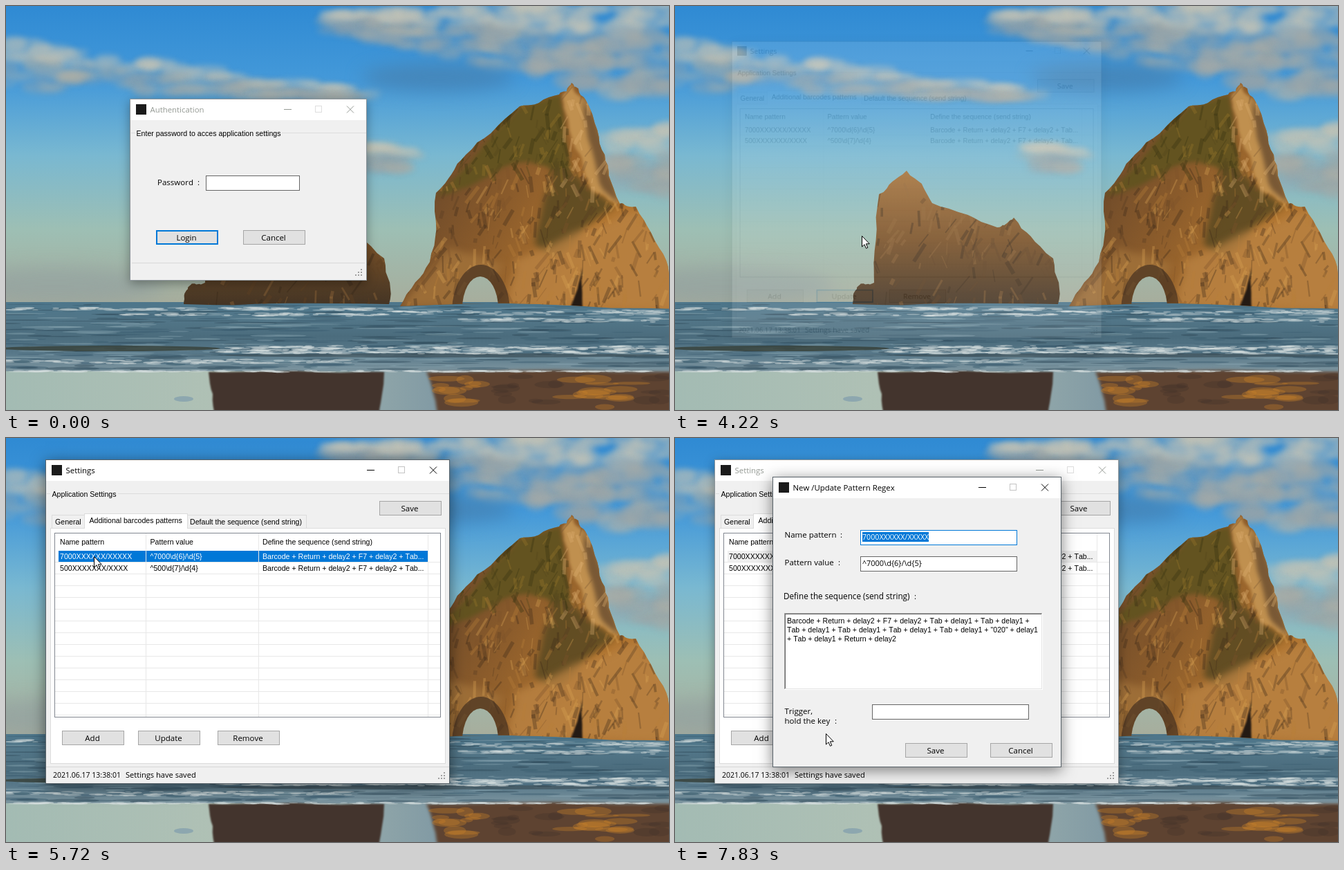
Animation of 959 by 584 pixels, one loop 8000 ms. Source, as an HTML page with a canvas:

```html
<!DOCTYPE html>
<html lang="en">
<head>
<meta charset="utf-8">
<title>Password dialog and settings</title>
<style>
html, body { margin: 0; width: 100%; height: 100%; overflow: hidden; background: #4a7690; }
canvas { display: block; width: 959px; height: 584px; }
</style>
</head>
<body>
<canvas id="stage" width="959" height="584"></canvas>
<script>
const W = 959, H = 584, LOOP = 8000;
const UI = '"Open Sans", "Noto Sans", sans-serif';
const MS = '"Liberation Sans", Arial, sans-serif';
const BLUE = '#0078d7', FACE = '#f0f0f0', INK = '#000';
const c = document.getElementById('stage').getContext('2d');

function layer() {
  const el = document.createElement('canvas');
  el.width = W;
  el.height = H;
  return el.getContext('2d');
}

// ---------- landscape ----------
let seed = 7;
const rnd = (a = 0, b = 1) => {
  seed = (seed * 16807) % 2147483647;
  return a + (b - a) * seed / 2147483647;
};
const pick = list => list[Math.floor(rnd(0, list.length))];

function ramp(g, x0, y0, x1, y1, cols) {
  const r = g.createLinearGradient(x0, y0, x1, y1);
  cols.forEach((col, i) => r.addColorStop(i / (cols.length - 1), col));
  return r;
}

const points = s => s.split(' ').map(p => p.split(',').map(Number));

function path(g, pts) {
  g.beginPath();
  pts.forEach(p => g.lineTo(...p));
  g.closePath();
}

// Roughens an outline by shifting the middle of each side, three times over.
function crag(s, rough) {
  let pts = points(s);
  for (let k = 0; k < 3; k++, rough /= 2) {
    pts = pts.flatMap((p, i) => {
      const q = pts[(i + 1) % pts.length];
      return [p, [0, 1].map(d => (p[d] + q[d]) / 2 + rnd(-rough, rough))];
    });
  }
  return pts;
}

function shape(g, s, fill, blur = 0, alpha = 1, rough = 6) {
  g.save();
  if (blur) g.filter = `blur(${blur}px)`;
  g.globalAlpha = alpha;
  g.fillStyle = fill;
  path(g, crag(s, rough));
  g.fill();
  g.restore();
}

function oval(g, x, y, rx, ry, fill, alpha = 1) {
  g.globalAlpha = alpha;
  g.fillStyle = fill;
  g.beginPath();
  g.ellipse(x, y, rx, ry, 0, 0, 7);
  g.fill();
  g.globalAlpha = 1;
}

// A sloping bank of cloud whose depth runs from h0 to h1; the upper part is sunlit.
function cloud(g, n, x, y, w, slope, h0, h1, alpha) {
  g.save();
  g.filter = 'blur(4px)';
  for (let i = 0; i < n; i++) {
    const u = rnd(), v = rnd(), h = h0 + (h1 - h0) * u;
    const col = v < .35 ? '#cbc5b5' : pick(['#a5aaa6', '#b5b2a6', '#97a3a8']);
    oval(g, x + u * w, y + u * slope + v * h, rnd(14, 36), rnd(3, 4 + h / 10), col, alpha);
  }
  g.restore();
}

function strokes(g, n, x, y, w, h, cols, alpha) {
  g.save();
  g.filter = 'blur(.7px)';
  g.globalAlpha = alpha;
  for (let i = 0; i < n; i++) {
    const px = x + rnd(0, w), py = y + rnd(0, h), len = rnd(6, 26);
    g.strokeStyle = pick(cols);
    g.lineWidth = rnd(1, 6);
    g.beginPath();
    g.moveTo(px, py);
    g.lineTo(px + len * rnd(-.9, .6), py + len);
    g.stroke();
  }
  g.restore();
}

function foam(g, x0, x1, y, h) {
  for (let i = 0; i < (x1 - x0) / 6; i++) {
    oval(g, rnd(x0, x1), y + rnd(-h, h), rnd(4, 16), rnd(.5, 1.6), '#d5dddd', .45);
  }
}

function sky(g) {
  g.fillStyle = ramp(g, 0, 0, 0, 430, ['#2f8ad3', '#4499d9', '#79b8d1', '#9dbfb4', '#a7ad9c']);
  g.fillRect(0, 0, W, 430);
  cloud(g, 120, -20, 45, 550, 80, 75, 12, .4);
  cloud(g, 200, 470, 10, 510, -25, 25, 160, .42);
  cloud(g, 25, 520, 192, 70, 15, 50, 25, .4);
  cloud(g, 45, 875, 185, 100, -10, 70, 110, .4);
  g.save();
  g.filter = 'blur(12px)';
  oval(g, 625, 103, 110, 20, '#4684b6', .85);
  oval(g, 70, 405, 160, 28, '#8f9fa0', .6);
  g.restore();
}

function sea(g) {
  g.fillStyle = ramp(g, 0, 428, 0, 528, ['#4d768b', '#527688', '#4b6c7d', '#59798a', '#7d959f']);
  g.fillRect(0, 428, W, 100);
  for (let i = 0; i < 380; i++) {
    const v = rnd();
    oval(g, rnd(0, W), 431 + 95 * v, rnd(10, 50), rnd(.5, 1 + 1.5 * v), pick(['#2e4857', '#385a6d', '#8aa6b1']), .45);
  }
  oval(g, 150, 495, 160, 4, '#39433d', .85);
  oval(g, 640, 505, 330, 3, '#3e5059', .7);
}

function waves(g) {
  foam(g, 0, 560, 438, 2);
  foam(g, 170, 560, 446, 2);
  foam(g, 560, W, 443, 4);
  foam(g, 650, W, 454, 3);
  for (let i = 0; i < 3; i++) foam(g, 310, W, 496 + i, 5);
  foam(g, 0, 500, 514, 3);
  foam(g, 0, W, 528, 1);
}

function sand(g) {
  g.fillStyle = ramp(g, 0, 0, W, 0, ['#a3bbb3', '#b0c1b5', '#7f98a3', '#7c8b91']);
  g.fillRect(0, 528, W, 56);
  shape(g, '293,529 547,529 538,600 302,600', '#43342d', 1, 1, 4);
  shape(g, '608,529 980,529 980,600 627,600', '#5e4331', 2, 1, 4);
  for (let i = 0; i < 45; i++) {
    const u = rnd(), gold = Math.sin(9 * u + 1.2) > .1;
    oval(g, 618 + 340 * u, rnd(532, 580), rnd(8, 28), rnd(2, 7), gold ? '#c8822a' : '#44332a', .35);
  }
  oval(g, 257, 568, 14, 4, '#7f9dac', .7);
}

function smallRock(g) {
  const body = crag('257,431 266,404 288,400 295,272 335,238 372,285 466,320 490,306 547,365 554,431', 5);
  path(g, body);
  g.fillStyle = ramp(g, 0, 240, 0, 430, ['#a5733c', '#7b5228', '#453524']);
  g.fill();
  g.save();
  g.clip();
  strokes(g, 180, 255, 240, 300, 190, ['#38291a', '#94683a', '#5f4122'], .4);
  g.restore();
}

function bigRock(g) {
  const r = layer();
  const body = crag('570,434 613,370 622,270 665,215 743,145 800,128 818,111 838,135 866,215 888,286 911,290 955,368 975,438', 5);
  path(r, body);
  r.fillStyle = ramp(r, 600, 230, 950, 420, ['#68472a', '#8a5b2b', '#b0742f', '#ae7434']);
  r.fill();
  r.clip();
  shape(r, '622,275 743,145 802,128 818,240 755,225 690,250', '#635320', 3);
  shape(r, '790,225 822,240 880,290 800,360 765,345', '#584822', 5, .85);
  shape(r, '735,368 911,295 975,368 975,438 722,438', '#b98243', 6, .8);
  shape(r, '570,434 640,350 720,375 660,438', '#a3733b', 6, .8);
  strokes(r, 420, 570, 230, 390, 210, ['#3a2817', '#b9803b', '#7b5329', '#dba355', '#543a20'], .33);
  strokes(r, 130, 630, 130, 185, 110, ['#393512', '#93742a', '#54461c'], .38);
  shape(r, '806,128 818,111 838,135 888,286 845,262 818,190', '#c0904f', 2);
  shape(r, '832,122 866,205 892,292 858,255', '#6d4f31', 3, .85);
  strokes(r, 50, 805, 115, 75, 150, ['#dcb070', '#7a5833'], .35);
  shape(r, '816,438 833,378 834,438', '#241a13', 1, 1, 2);
  oval(r, 687, 442, 42, 68, '#3f2d1f', .65);
  r.globalCompositeOperation = 'destination-out';
  oval(r, 686, 437, 26, 46, '#000');
  g.drawImage(r.canvas, 0, 0);
}

const bg = layer();
[sky, sea, smallRock, bigRock, sand, waves].forEach(paint => paint(bg));

// ---------- controls ----------
function text(g, s, x, y, size = 11.5, face = UI, col = INK, align = 'left') {
  g.font = `${size}px ${face}`;
  g.fontKerning = 'none';
  g.textAlign = align;
  g.fillStyle = col;
  g.fillText(s, x, y);
}
const ms = (g, s, x, y, col) => text(g, s, x, y, 10.6, MS, col);

function label(g, s, x, y, colon, size) {
  text(g, s, x, y, size);
  text(g, ':', colon, y);
}

function rect(g, x, y, w, h, fill) {
  g.fillStyle = fill;
  g.fillRect(x, y, w, h);
}

function box(g, x, y, w, h, fill, line, lw = 1) {
  rect(g, x, y, w, h, line);
  rect(g, x + lw, y + lw, w - 2 * lw, h - 2 * lw, fill);
}

function button(g, s, x, y, state = '') {
  const fill = { hover: '#e5f1fb', press: '#cce4f7' }[state] || '#e1e1e1';
  box(g, x, y, 90, 21, fill, state ? BLUE : '#a6a6a6', state === 'focus' ? 2 : 1);
  text(g, s, x + 44, y + 14.5, 11.5, UI, INK, 'center');
}

const field = (g, x, y, w, on) => box(g, x, y, w, 22, '#fff', on ? BLUE : '#666');

function frame(g, title, x, y, w, h, on) {
  const r = x + w, m = y + 15.5, ink = on ? INK : '#959a94';
  g.save();
  g.shadowColor = on ? 'rgba(0,0,0,.5)' : 'rgba(0,0,0,.35)';
  g.shadowBlur = on ? 20 : 14;
  g.shadowOffsetY = 4;
  rect(g, x, y, w, h, on ? '#59636a' : '#8c9499');
  g.restore();
  rect(g, x + 1, y + 1, w - 2, h - 2, FACE);
  rect(g, x + 1, y + 1, w - 2, 30, '#fff');
  rect(g, x + 9, y + 8, 15, 15, '#1b1b1b');
  text(g, title, x + 29.5, y + 19.5, 11.4, UI, ink);
  rect(g, r - 120, y + 15, 11, 1, ink);
  g.lineWidth = 1;
  g.strokeStyle = on ? '#c4c4c4' : '#dedede';
  g.strokeRect(r - 74.5, m - 5, 9, 9);
  g.strokeStyle = ink;
  g.beginPath();
  [-5, 5].forEach(d => {
    g.moveTo(r - 24 - d, m - 5);
    g.lineTo(r - 24 + d, m + 5);
  });
  g.stroke();
}

function grip(g, r, b) {
  for (let i = 0; i < 3; i++)
    for (let j = 0; j < 3 - i; j++) rect(g, r - 9 - 4 * j, b - 9 - 4 * i, 2, 2, '#a0a0a0');
}

// ---------- windows ----------
const typed = [1750, 2010, 2140, 2470, 2670];

function loginWindow(g, t, at) {
  const on = t >= 870, edit = on && t < 3800;
  frame(g, 'Authentication', 179, 134, 343, 263, on);
  rect(g, 181, 183, 340, 1, '#dcdcdc');
  rect(g, 187, 183, 212, 1, FACE);
  ms(g, 'Enter password to acces application settings', 188.5, 188);
  label(g, 'Password', 219, 259, 277);
  field(g, 289, 245, 136, edit);
  const n = typed.filter(k => t >= k).length;
  for (let i = 0; i < n; i++) oval(g, 295 + 6 * i, 253.5, 2.2, 1.8, INK);
  const caret = (t >= 1010 && t < 1620) || (t >= 1810 && t < 3200);
  if (caret) rect(g, 292 + 6 * n, 249, 1, 13, INK);
  let state = on ? '' : 'focus';
  if (t >= 3460 && inside(at, 217, 324)) state = t >= 3800 && t < 3900 ? 'press' : 'hover';
  button(g, 'Login', 217, 324, state);
  button(g, 'Cancel', 343, 324);
  rect(g, 182, 371, 337, 1, '#d9d9d9');
  grip(g, 522, 397);
}

function settingsWindow(g, t, at) {
  const on = t < 7490, picked = t >= 5590, line = '#dcdcdc', grid = '#e8e8e8';
  frame(g, 'Settings', 57, 31, 585, 469, on);
  rect(g, 59, 80, 582, 1, line);
  rect(g, 64, 80, 98, 1, FACE);
  ms(g, 'Application Settings', 66.5, 85);
  button(g, 'Save', 540, 91);
  box(g, 64, 130, 572, 341, '#fff', line);
  box(g, 66, 111, 48, 20, FACE, line);
  box(g, 262, 111, 173, 20, FACE, line);
  box(g, 113, 109, 150, 22, '#fff', line);
  rect(g, 114, 129, 148, 3, '#fff');
  ms(g, 'General', 71, 125);
  ms(g, 'Additional barcodes patterns', 120.5, 123);
  ms(g, 'Default the sequence (send string)', 266, 125);

  box(g, 70, 137, 559, 267, '#fff', '#828790');
  for (let y = 179; y < 403; y += 17) rect(g, 71, y, 557, 1, grid);
  if (picked) rect(g, 76, 163, 535, 16, on ? BLUE : FACE);
  [202, 365, 610].forEach(x => rect(g, x, 138, 1, 265, grid));
  const seq = 'Barcode + Return + delay2 + F7 + delay2 + Tab...';
  [['Name pattern', 'Pattern value', 'Define the sequence (send string)'],
    ['7000XXXXXX/XXXXX', '^7000\\d{6}/\\d{5}', seq],
    ['500XXXXXXX/XXXX', '^500\\d{7}/\\d{4}', seq]].forEach((row, i) => {
    const y = i ? 158 + 17 * i : 154, ink = i === 1 && picked && on ? '#fff' : INK;
    row.forEach((s, j) => ms(g, s, [78, 208.5, 371][j], y, ink));
  });

  let state = picked ? '' : 'focus';
  if (t > 6530 && inside(at, 191, 423)) state = t >= 7350 && t < 7430 ? 'press' : 'hover';
  button(g, 'Add', 81, 423);
  button(g, 'Update', 191, 423, state);
  button(g, 'Remove', 306, 423);
  rect(g, 58, 475, 583, 1, '#d7d7d7');
  text(g, '2021.06.17 13:38:01', 68, 491, 10.5);
  text(g, 'Settings have saved', 173, 491, 11.1);
  grip(g, 642, 500);
}

function patternWindow(g) {
  frame(g, 'New /Update Pattern Regex', 141, 56, 418, 420, true);
  label(g, 'Name pattern', 158.5, 144, 239);
  label(g, 'Pattern value', 158.5, 184, 236);
  label(g, 'Define the sequence (send string)', 157, 233, 346, 11.7);
  text(g, 'Trigger,', 158.5, 399);
  label(g, 'hold the key', 158.5, 413, 231);
  field(g, 268, 133, 227, true);
  rect(g, 271, 136, 96, 14, BLUE);
  text(g, '7000XXXXXX/XXXXX', 271, 147, 10.7, UI, '#fff');
  field(g, 268, 171, 227);
  text(g, '^7000\\d{6}/\\d{5}', 271, 185, 11);
  field(g, 285, 385, 227);

  // Sunken edge: dark above and left, light below and right.
  ['#fff', '#a0a0a0', '#e3e3e3', '#696969', '#fff'].forEach((col, i) => {
    const d = i >> 1;
    rect(g, 158 + d, 253 + d, 374 - i, 111 - i, col);
  });
  const td = 'Tab + delay1';
  [`Barcode + Return + delay2 + F7 + delay2 + ${td} + ${td} +`,
    `${td} + ${td} + ${td} + ${td} + "020" + delay1`,
    `+ ${td} + Return + delay2`].forEach((s, i) => ms(g, s, 162, 268 + 13 * i));
  button(g, 'Save', 333, 441);
  button(g, 'Cancel', 456, 441);
}

// ---------- pointer ----------
const part = (t, from, len) => Math.min(1, Math.max(0, (t - from) / len));
const smooth = u => u * u * (3 - 2 * u);
const inside = ([x, y], bx, by) => x >= bx && x < bx + 90 && y >= by && y < by + 21;

// Start time, duration, destination.
const moves = [[330, 270, 320, 268], [800, 130, 323, 257], [3460, 140, 288, 325],
  [3850, 370, 270, 332], [4480, 1060, 127, 171], [6530, 620, 218, 427]];

const pointerAt = t => moves.reduce(([x, y], [from, len, tx, ty]) => {
  const e = smooth(part(t, from, len));
  return [x + (tx - x) * e, y + (ty - y) * e];
}, [546, 491]);

function pointer(g, t, [x, y]) {
  if (t < 330 || (t >= 1750 && t < 3460)) return;
  g.save();
  g.translate(Math.round(x), Math.round(y));
  if (t >= 800 && t < 3510) {
    rect(g, 0, -7, 1, 15, INK);
    [-8, 7].forEach(k => {
      rect(g, -3, k, 3, 1, INK);
      rect(g, 1, k, 3, 1, INK);
    });
  } else {
    path(g, points('0.5,0.5 0.5,16 4,12.7 6.5,18.3 8.8,17.3 6.4,11.8 11.3,11.8'));
    g.fillStyle = '#fff';
    g.fill();
    g.lineWidth = 1;
    g.strokeStyle = INK;
    g.stroke();
  }
  g.restore();
}

// ---------- playback ----------
const temp = layer();

// Windows fade while growing from 90 % around their centre.
function show(paint, p, cx, cy) {
  if (p <= 0) return;
  if (p >= 1) return paint(c);
  temp.clearRect(0, 0, W, H);
  paint(temp);
  const s = .9 + .1 * (1 - (1 - p) ** 1.5);
  c.save();
  c.globalAlpha = p;
  c.translate(cx, cy);
  c.scale(s, s);
  c.drawImage(temp.canvas, -cx, -cy);
  c.restore();
}

function draw(t) {
  const at = pointerAt(t);
  c.drawImage(bg.canvas, 0, 0);
  show(g => loginWindow(g, t, at), 1 - part(t, 4000, 150), 350, 265);
  show(g => settingsWindow(g, t, at), part(t, 4200, 195), 350, 265);
  show(patternWindow, part(t, 7530, 210), 350, 266);
  pointer(c, t, at);
}

const start = performance.now();
function tick() {
  draw((performance.now() - start) % LOOP);
  requestAnimationFrame(tick);
}
tick();
</script>
</body>
</html>
```
